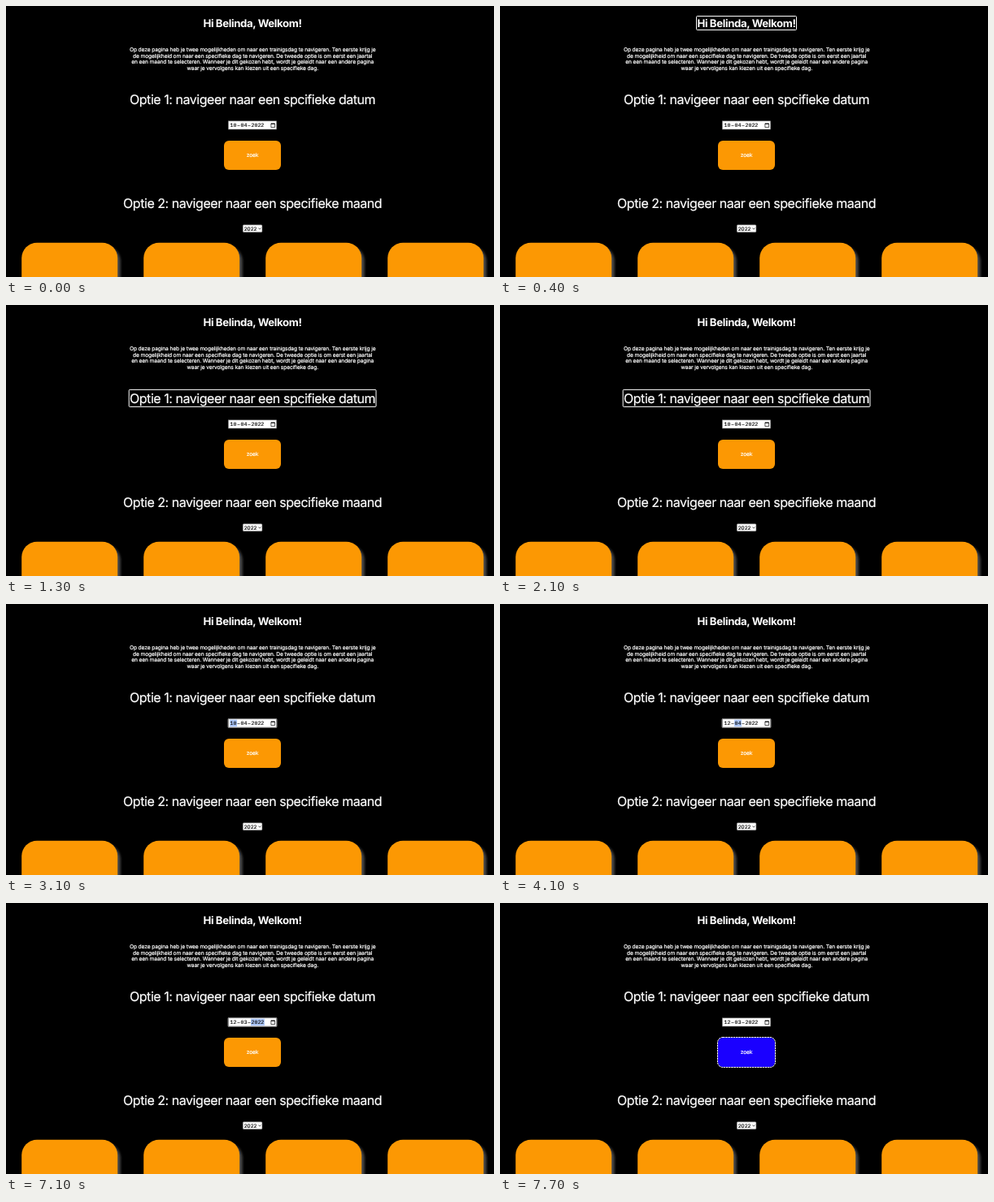
Write an HTML page that moves like this. It is 600 px wide and 334 px high and loops after 8 s.

```html
<!DOCTYPE html>
<html lang="nl">
<head>
<meta charset="utf-8">
<title>Navigeren met het toetsenbord</title>
<style>
  html, body { margin: 0; width: 100%; height: 100%; overflow: hidden; background: #000; }
  svg { display: block; width: 100%; height: 100%; }
  text { font-family: Inter, "Open Sans", sans-serif; fill: #fff; stroke: #fff; stroke-width: .2; text-anchor: middle; text-rendering: geometricPrecision; }
  .title { font-size: 13.2px; font-weight: 700; letter-spacing: -.027em; stroke: none; }
  .heading { font-size: 16px; letter-spacing: -.0285em; }
  .body { font-size: 6.67px; letter-spacing: -.018em; }
  .year { font-size: 6.4px; fill: #000; stroke: #000; stroke-width: .15; }
  .date text { font: 6.67px "Liberation Mono", monospace; fill: #000; stroke: #000; stroke-width: .1; text-anchor: start; }
  .ring { fill: none; stroke: #fff; stroke-width: 1; visibility: hidden; }
  .ring.on { visibility: visible; }
  .card { fill: #fc9803; }
  .shadow { fill: #484848; filter: url(#blur); }
  .icon { fill: none; stroke: #111; stroke-width: .7; }
</style>
</head>
<body>
<svg viewBox="0 0 600 334">
  <defs>
    <filter id="blur"><feGaussianBlur stdDeviation="1.6"/></filter>
  </defs>
  <rect width="600" height="334"/>

  <text class="title" x="303" y="25.6">Hi Belinda, Welkom!</text>
  <g id="intro"></g>
  <text class="heading" x="303.1" y="121">Optie 1: navigeer naar een spcifieke datum</text>

  <g class="date">
    <rect x="273.3" y="141.8" width="59.4" height="10.2" fill="#fff" stroke="#767676" stroke-width=".6"/>
    <rect id="highlight" y="142.6" height="8.6" fill="#adc8fa"/>
    <text id="day" x="275.6" y="149.4"></text>
    <text x="284.1" y="149.4">–</text>
    <text id="month" x="288.5" y="149.4"></text>
    <text x="297" y="149.4">–</text>
    <text x="301.4" y="149.4">2022</text>
    <path class="icon" d="M325.9 144.9h4.6v4.7h-4.6zM325.9 145.5h4.6M327 144v1M329.4 144v1"/>
  </g>

  <rect id="button" x="268" y="166" width="70" height="36" rx="6"/>
  <text class="body" x="303" y="186.2">zoek</text>

  <text class="heading" x="303.1" y="249">Optie 2: navigeer naar een specifieke maand</text>
  <rect x="291.3" y="269.8" width="23.6" height="9" rx="1" fill="#fff" stroke="#767676" stroke-width=".5"/>
  <text class="year" x="300.6" y="276.7">2022</text>
  <path class="icon" d="M310.3 273.6l1.6 1.6 1.6-1.6"/>

  <g id="cards"></g>

  <rect class="ring" x="241.5" y="12.5" width="123" height="17" rx="1"/>
  <rect class="ring" x="151" y="48.7" width="304.3" height="33" rx="1"/>
  <rect class="ring" x="151.2" y="104.4" width="303.8" height="21" rx="1"/>
  <rect class="ring" x="272.9" y="141.4" width="60.2" height="11" rx="1" style="stroke:#999;stroke-width:.7"/>
  <rect class="ring" x="267.5" y="165.5" width="71" height="37" rx="6.5" stroke-dasharray="2.5 .7"/>
</svg>
<script>
const LOOP = 8000;
const FOCUS_TIMES = [400, 1000, 1300, 2400, 7600];
const BUTTON_FOCUS = 7600, FADE = 100;
const ORANGE = [252, 152, 3], BLUE = [26, 0, 255];

const byId = id => document.getElementById(id);
const rings = [...document.querySelectorAll('.ring')];

byId('intro').innerHTML = [
  'Op deze pagina heb je twee mogelijkheden om naar een trainigsdag te navigeren. Ten eerste krijg je',
  'de mogelijkheid om naar een specifieke dag te navigeren. De tweede optie is om eerst een jaartal',
  'en een maand te selecteren. Wanneer je dit gekozen hebt, wordt je geleidt naar een andere pagina',
  'waar je vervolgens kan kiezen uit een specifieke dag.'
].map((line, i) => `<text class="body" x="303.2" y="${55.6 + i * 7.92}">${line}</text>`).join('');

const card = (name, x, y) =>
  `<rect class="${name}" x="${x}" y="${y}" width="118" height="80" rx="19"/>`;
byId('cards').innerHTML = [0, 1, 2, 3].map(i => {
  const x = 19.2 + i * 150;
  return card('shadow', x + 3.5, 295.7) + card('card', x, 291.7);
}).join('');

// Position and width of the selected part of the date
function selection(t) {
  if (t < 2400 || t >= BUTTON_FOCUS) return [0, 0];
  if (t < 3900) return [275.2, 8.9];
  if (t < 5900) return [288.1, 8.9];
  return [301, 16.9];
}

function draw(t) {
  const focused = FOCUS_TIMES.filter(start => t >= start).length - 1;
  rings.forEach((ring, i) => ring.classList.toggle('on', i === focused));

  byId('day').textContent = t < 3900 ? '10' : '12';
  byId('month').textContent = t < 5000 ? '04' : '03';
  const [x, width] = selection(t);
  byId('highlight').setAttribute('x', x);
  byId('highlight').setAttribute('width', width);

  const mix = Math.min(1, Math.max(0, (t - BUTTON_FOCUS) / FADE));
  const color = ORANGE.map((c, i) => Math.round(c + (BLUE[i] - c) * mix));
  byId('button').setAttribute('fill', `rgb(${color})`);
}

const start = performance.now();
function tick() {
  draw((performance.now() - start) % LOOP);
  requestAnimationFrame(tick);
}
tick();
</script>
</body>
</html>
```
